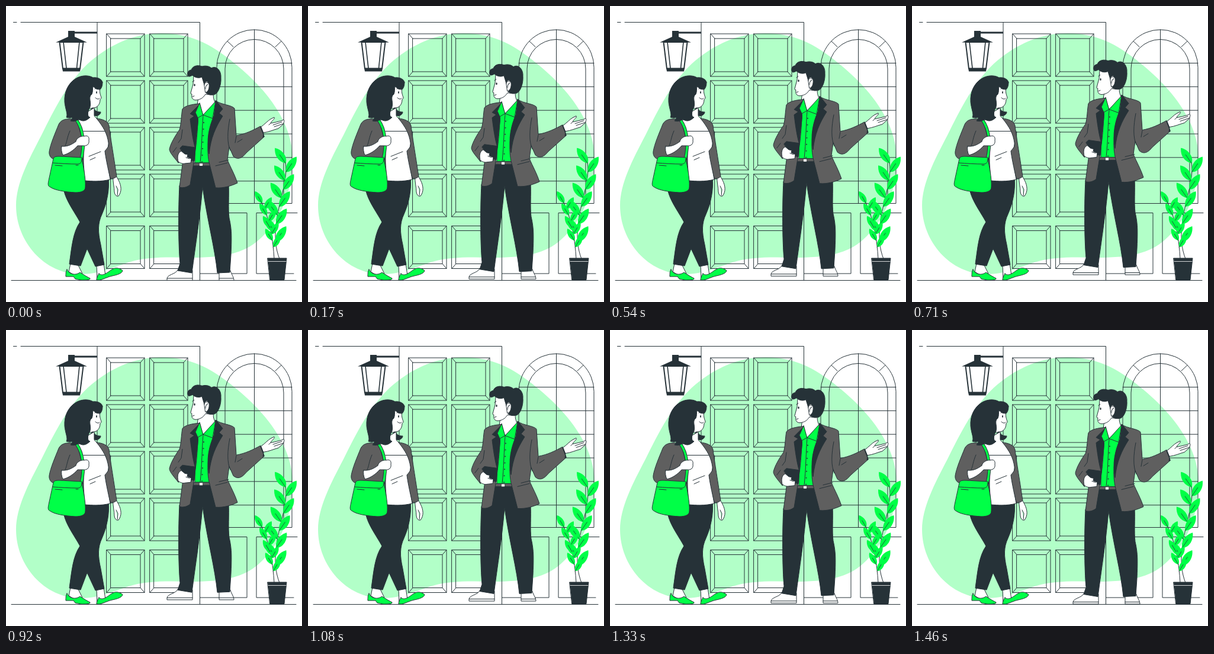
Write an HTML page that moves like this. It is 500x500 px and loops after 1500 ms.

```html
<!DOCTYPE html>
<html lang="en">
<head>
<meta charset="utf-8">
<title>Welcome at the door</title>
<style>
  html, body { margin: 0; width: 100%; height: 100%; overflow: hidden; background: #fff; }
  svg { display: block; width: 100vw; height: 100vh; }
  .line { fill: none; }
  .skin { fill: #fff; }
  .dark { fill: #263238; }
  .coat { fill: #5f5f5f; }
  .green { fill: #00ff47; }
</style>
</head>
<body>
<svg viewBox="0 0 500 500" stroke="#263238" stroke-linejoin="round" stroke-linecap="round">
  <path id="backdrop" fill="#b2ffc8" stroke="none" d="M17 337C17 300 38 260 60 218C82 174 98 142 126 110C154 79 203 46 262 46C318 46 354 70 390 100C442 143 484 198 484 258C484 318 461 366 426 396C402 417 368 425 316 425C276 424 237 423 207 433C180 442 156 453 126 453C65 453 17 398 17 337Z"/>

  <g class="line">
    <path d="M12.500 27.500H18M25 27.500H327.500V463M154 27.500V463"/>
    <path id="panels"/>
    <path id="window"/>
    <path d="M341 349.500H407V452H328M492 349.500H423V452H486M9 463.500H490"/>
  </g>

  <g id="lamp">
    <path class="skin" stroke-width="2" d="M90.500 61L96 106H125L130.500 61Z"/>
    <path class="line" stroke-width="1.600" d="M97 61L102 105M124 61L119.500 105"/>
    <path class="dark" stroke="none" d="M105 42H116V43.500H154V46.500H116V52L137 61.500H84L105 52ZM95 104.500H126L125 110.500H96Z"/>
  </g>

  <g id="plant">
    <path id="shoot" class="line" d="M432 332C445 360 451 393 453 427"/>
    <path id="stem" class="line" d="M472 264C475 283 470 303 465 324C458 353 448 392 462 427"/>
    <g id="leaves" stroke-width=".8"></g>
    <path class="dark" d="M442 426H474L470 462.500H446Z"/>
    <path class="line" stroke="#fff" stroke-width=".8" d="M443 431.500H473"/>
  </g>

  <g id="woman">
    <path class="dark" d="M147 169C149 177 153 179 160 179C160 183 155 187 149 185L137 187Z"/>
    <path class="skin" d="M181 288C180 297 183 305 183 314C184 320 187 322 190 321C196 313 195 304 190 294L186 287ZM186 304L189 310L188 320"/>
    <path class="skin" d="M109 435L106 449L118 456L129 452L122 438ZM153 437L154 459L168 455L165 435Z"/>
    <path class="green" d="M103 445C106 453 117 456 125 450C131 454 138 458 142 460C143 463 135 463 127 463L117 461L114 457L101 457C101 452 101 448 103 445ZM157 452C164 459 174 447 181 444C187 441 194 444 197 447C196 453 183 455 175 457L159 463H153C153 459 155 456 157 452Z"/>
    <path class="dark" d="M133 290H173C175 309 171 332 162 352C155 367 155 381 160 403L166 437L151 440L137 410L126 439L107 436C111 407 113 382 125 365C116 348 98 325 97 306Z"/>
    <path class="skin" d="M137 179L149 172L149 185C151 190 157 191 163 196L175 222L170 253L176 293C160 297 145 296 133 295L127 205L120 193C130 192 136 189 137 179Z"/>
    <path class="line" d="M131 211.500H169M140 254L160 246M142 260L151 256"/>
    <path class="coat" d="M153 190C163 191 172 194 174 202C176 219 181 248 187 288C184 291 180 292 176 291C172 274 168 254 167 245C172 239 174 237 173 231C171 216 165 205 153 190Z"/>
    <path class="coat" d="M119 192C104 189 93 191 89 200C83 215 75 233 73 246C72 254 78 260 86 259L96 257L100 270H130C133 247 130 223 119 192Z"/>
    <path class="line" d="M108 211C103 222 103 230 100 236"/>
    <path class="line" stroke-width="5.500" d="M120 194C129 207 134 231 127 259"/>
    <path class="line" stroke="#00ff47" stroke-width="3.500" d="M120 194C129 207 134 231 127 259"/>
    <path class="skin" d="M94 237C104 238 111 234 118 229C119 223 127 219 132 220C138 218 141 221 140 227C141 233 137 237 130 236L121 236C114 244 105 250 96 252C94 247 93 242 94 237Z"/>
    <path class="green" d="M80 258C81 254 85 254 91 254L128 256C130 271 135 289 134 306C134 313 126 315 117 315C99 314 82 311 75 306C70 304 71 300 72 295Z"/>
    <path class="line" d="M79 265C91 266 107 267 121 267C126 267 128 264 128 258M83 269L95 270M118 269H122"/>
    <path class="skin" d="M146 133C152 129 160 131 159 139C157 147 161 153 161 155C161 157 159 157 159 158C159 167 153 173 146 172C139 176 132 166 132 157Z"/>
    <path class="dark" d="M163 129C162 123 154 120 147 121C139 116 126 117 117 123C105 131 98 145 99 162C100 174 105 183 102 188C108 190 110 189 112 188C112 192 109 193 109 194C116 196 121 193 123 191C130 197 137 193 142 188C137 187 138 180 140 175C147 164 137 155 145 149C147 145 146 140 147 136C151 138 150 141 159 141C162 138 163 134 163 129Z"/>
    <path class="line" d="M150 140Q152 138 154 140M151 155Q155 159 158 156"/>
    <ellipse class="dark" cx="153" cy="146" rx="1" ry="1.900" stroke="none"/>
  </g>

  <g id="man">
    <path class="skin" d="M290 446C286 454 272 453 272 461V463.500H315V447ZM360 448V463.500H385C385 458 381 454 379 447ZM272 460H315M360 460H384"/>
    <path class="dark" d="M312 266H347L376 300C377 322 375 342 377 358C382 379 381 395 380 420L378 450L357 451C353 410 340 362 332 306C328 355 320 405 314 451L290 447L294 435C291 405 291 340 293 304Z"/>
    <path class="skin" d="M326 149L351 146C349 153 351 159 354 164L339 199L322 176Z"/>
    <path class="green" d="M327 166L320 182L319 265H344L353 190L355 162L333 184Z"/>
    <path class="line" d="M333 185C331 207 331 239 328 265"/>
    <path class="line" stroke-width="2" stroke-dasharray="0 11" d="M334 197L331 264"/>
    <path class="coat" d="M315 265H346V270H315Z"/>
    <path class="skin" stroke="none" d="M327 266H332V270H327Z"/>
    <path class="coat" d="M326 165C315 166 303 168 298 174C296 184 296 200 293 209C286 219 278 232 276 242C276 248 287 259 291 265L299 260L293 306C299 308 306 306 311 302L317 265L320 243C323 221 324 199 324 190Z"/>
    <path class="coat" d="M354 160C364 167 381 167 386 173L389 219C405 216 417 210 430 203C431 209 435 215 436 221L406 248C398 258 391 260 384 254L377 238L374 260C380 274 386 284 391 299C380 304 368 308 354 307L343 264C338 239 342 212 353 190Z"/>
    <path class="dark" d="M325 168L311 182L318 186L311 191C313 208 316 229 320 241C320 218 326 197 324 189L319 180ZM355 160L366 174L360 181L366 186C354 205 346 222 343 250C338 226 343 204 351 186Z"/>
    <path class="green" d="M327 164L320 180L324 189L333 184L349 190L354 161L333 184Z"/>
    <path class="line" d="M378 191C374 211 373 232 379 244M389 220L387 231M391 230L399 225M298 209L296 224L291 231M354 270L374 265M360 264L376 260M282 247L288 239"/>
    <path class="dark" d="M294 240L298 236L320 239L318 262L306 259Z"/>
    <path class="skin" d="M291 263C289 255 290 248 296 245L302 250L307 251L306 255L313 258L312 265L302 266C298 267 294 265 291 263ZM304 256L310 258"/>
    <path class="dark" d="M430 204L436 207L434 222L436 221Z"/>
    <path class="skin" d="M431 204C438 199 442 194 447 191L453 188C455 191 448 194 447 198C454 197 460 195 465 194L469 192C471 194 469 197 468 200L460 207C452 209 444 213 435 214ZM447 198L444 201M451 201L466 196M453 204L468 199"/>
    <path class="skin" d="M317 118L316 132L312 147Q312 149 314 149C313 155 315 159 321 159C329 158 333 155 337 149L346 150L345 118Z"/>
    <path class="dark" d="M309 119C305 118 306 108 313 108C315 101 324 99 331 102C338 100 344 102 347 105C355 100 364 109 363 121C364 134 358 150 350 150C345 151 341 149 338 147L341 128C336 126 336 131 335 134C334 129 332 124 331 120C324 123 318 120 315 117C313 118 312 119 309 119Z"/>
    <path class="skin" d="M335 135C334 129 341 127 343 132C344 139 341 146 337 146ZM341 132C338 133 337 137 337 140"/>
    <path class="line" d="M315 128L318 126M315 153L318 152"/>
    <ellipse class="dark" cx="318.500" cy="133.500" rx="1.200" ry="2" stroke="none"/>
  </g>
</svg>
<script>
  const byId = id => document.getElementById(id);
  const setPath = (id, d) => byId(id).setAttribute('d', d);

  // Door panel: outer frame, inset frame and four mitred corners
  const panel = (x, y) => `M${x} ${y}h64v72h-64zm7 8h50v56h-50z` +
    `m0 0l-7 -8m57 8l7 -8m-7 64l7 8m-57 -8l-7 8`;
  let panels = '';
  for (let row = 0; row < 5; row++) {
    const y = 47 + row * 79 + (row === 4 ? 8.5 : 0);
    panels += panel(170, y) + panel(243, y);
  }
  setPath('panels', panels);

  // Two nested arches with a centre bar, spokes and evenly spaced cross bars
  const arch = (r, top) => `M${419.5 - r} 333.5V${top + r}a${r} ${r} 0 0 1 ${2 * r} 0V333.5`;
  let bars = '';
  for (let row = 0; row < 6; row++) bars += `M356 ${96.5 + row * 39.85}h127`;
  setPath('window', arch(63.5, 40) + 'H356' + arch(49.5, 56.5) + bars +
    'M419.5 40V333.5M374 59.5l10 9.500M465 59.5l-10 9.500');

  // Slender leaf with a short vein, growing from (x, y) towards (x + dx, y + dy)
  function leaf(x, y, dx, dy) {
    const at = (along, side) => `${dx * along - dy * side} ${dy * along + dx * side}`;
    return `<g transform="translate(${x} ${y})"><path class="green" stroke="none" ` +
      `d="M0 0C${at(.2, .3)} ${at(.7, .28)} ${dx} ${dy}C${at(.7, -.25)} ${at(.3, -.28)} 0 0"/>` +
      `<path class="line" d="M0 0L${at(.55, 0)}"/></g>`;
  }

  // Leaves alternate left and right down a stem
  function grow(id, count, dx, dy) {
    const stem = byId(id), length = stem.getTotalLength();
    let leaves = '';
    for (let i = 0; i < count; i++) {
      const { x, y } = stem.getPointAtLength(length * (.01 + .9 * i / count));
      leaves += leaf(x, y, i % 2 ? dx : -dx, dy);
    }
    return leaves;
  }
  byId('leaves').innerHTML = grow('stem', 10, 18, -26) + grow('shoot', 8, 12, -20);

  const LOOP = 1500, LIFT = 10;
  function draw(now) {
    const phase = now % LOOP / LOOP;
    const lift = LIFT * (1 - Math.abs(1 - 2 * phase));
    byId('man').setAttribute('transform', `translate(0 ${-lift})`);
    requestAnimationFrame(draw);
  }
  draw(performance.now());
</script>
</body>
</html>
```
